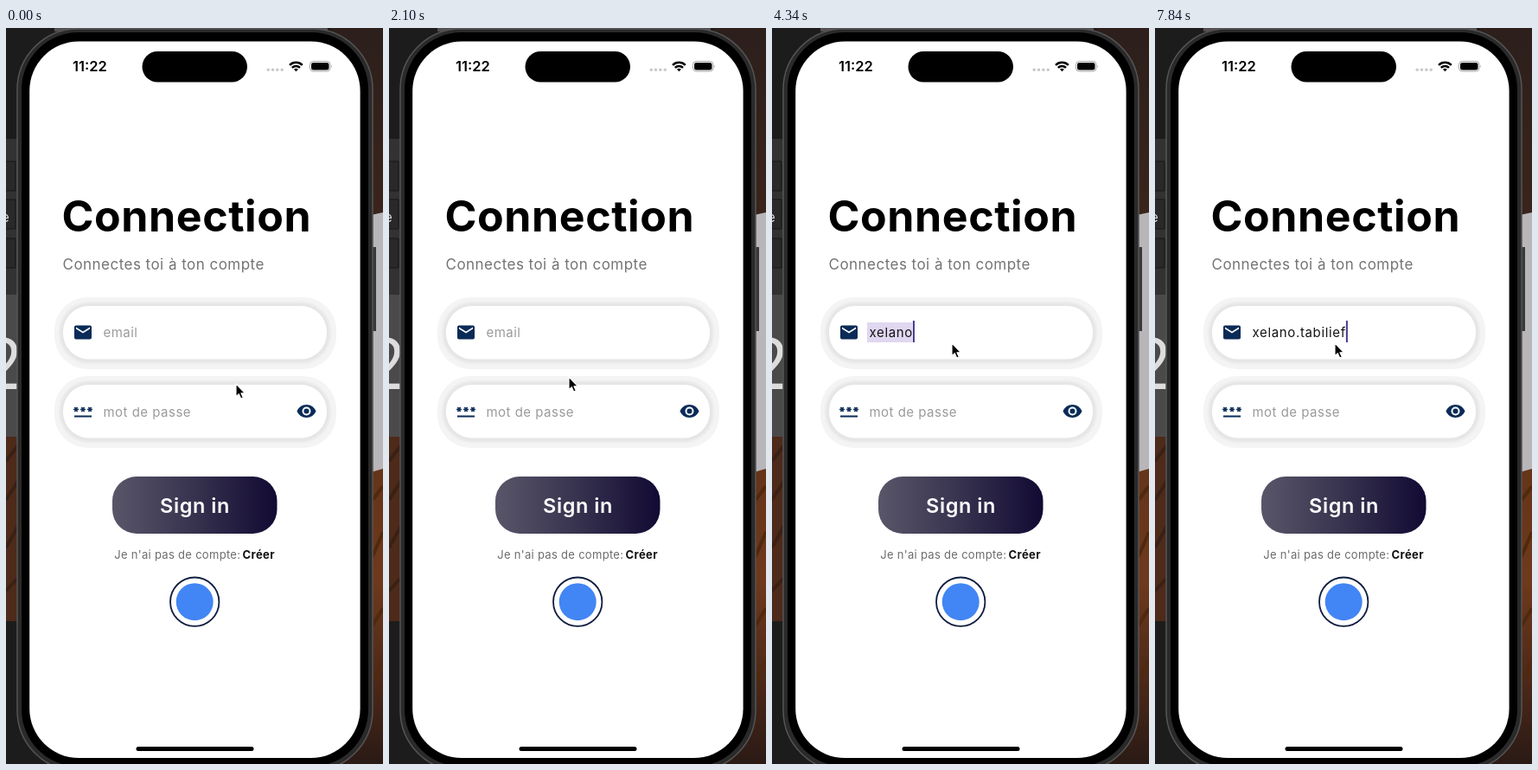
These frames come from a looping animation (436 px wide and 850 px high, 8000 ms). An HTML page:

```html
<!DOCTYPE html>
<html lang="fr">
<head>
<meta charset="utf-8">
<title>Connection</title>
<style>
  html, body { margin: 0; width: 100%; height: 100%; overflow: hidden; background: #1d1c1c; }
  svg { display: block; width: 436px; height: 850px; }
  text { font-family: Inter, "Open Sans", sans-serif; white-space: pre; }
  .title { font-size: 50px; font-weight: 700; letter-spacing: .6px; }
  .sub { font-size: 17px; letter-spacing: .47px; fill: #747474; }
  .hint { font-size: 15px; letter-spacing: .48px; fill: #9a9a9a; }
  .typed { font-size: 15px; letter-spacing: .65px; fill: #151515; }
  .action { font-size: 23.5px; font-weight: 600; letter-spacing: .55px; fill: #fff; }
  .note { font-size: 13px; letter-spacing: .3px; fill: #6c6c6c; }
  .link { font-weight: 700; letter-spacing: .4px; fill: #111; }
  .clock { font-size: 16.5px; font-weight: 600; }
  .icon { fill: #0a2b57; }
</style>
</head>
<body>
<svg viewBox="0 0 436 850">
  <defs>
    <linearGradient id="wood" x1="0" y1="0" x2="0" y2="1">
      <stop offset="0" stop-color="#2c1f1c"/>
      <stop offset=".25" stop-color="#3a241b"/>
      <stop offset=".6" stop-color="#653419"/>
      <stop offset=".75" stop-color="#6f391c"/>
      <stop offset=".9" stop-color="#482718"/>
      <stop offset="1" stop-color="#2a1a15"/>
    </linearGradient>
    <linearGradient id="button">
      <stop offset="0" stop-color="#595669"/>
      <stop offset=".5" stop-color="#37324e"/>
      <stop offset="1" stop-color="#120a33"/>
    </linearGradient>
    <filter id="soft" x="-10%" y="-30%" width="120%" height="160%">
      <feGaussianBlur stdDeviation="1.6"/>
    </filter>
    <g id="field">
      <rect x="56" y="311" width="326" height="83" rx="38" fill="#f4f4f4"/>
      <rect x="62" y="317" width="313" height="70" rx="34" fill="#e5e5e5" filter="url(#soft)"/>
      <rect x="66" y="321" width="305" height="61.500" rx="30" fill="#fff"/>
    </g>
    <path id="star" d="M1 9.970h6M2.500 7.370l3 5.200M5.500 7.370l-3 5.200" fill="none" stroke="#0a2b57" stroke-width="1.500"/>
  </defs>

  <!-- desktop -->
  <rect width="436" height="850" fill="#1d1c1c"/>
  <rect y="128" width="16" height="180" fill="#333232"/>
  <path d="M0 154h11v34H0M0 198h11v34H0M0 243h11v34H0" fill="#2a2929" stroke="#161616"/>
  <text x="-5" y="224" font-size="15" fill="#ddd">e</text>
  <rect y="308" width="16" height="164" fill="#4b4a4a"/>
  <text x="-27" y="417" font-size="82" fill="#ddd" style="font-family:'Open Sans',sans-serif">2</text>
  <rect y="472" width="16" height="213" fill="#4d2a1a"/>
  <path d="M0 500l14 -18M0 545l14 -22M0 600l14 -25M0 650l14 -15" stroke="#3a2015" stroke-width="4"/>
  <rect x="376" width="60" height="850" fill="url(#wood)"/>
  <path d="M424 545l12 -16M424 610l12 -28M424 690l12 -20M424 755l12 -25" stroke="#50290f" stroke-width="4"/>
  <path d="M422 216l14 -3v296l-14 4z" fill="#b8b6b9"/>
  <rect x="422" y="253" width="6" height="97" fill="#3a393b"/>
  <rect x="56" width="316" height="4" fill="#55504f"/>

  <!-- phone -->
  <rect x="13" y="1" width="411" height="857" rx="70" fill="#2a2a2b" stroke="#555" stroke-width="1.500"/>
  <rect x="18" y="5" width="401" height="848" rx="66"/>
  <rect x="27.200" y="15.500" width="382.400" height="827.500" rx="57" fill="#fff"/>
  <rect x="157.500" y="27" width="121.500" height="35.500" rx="17.750"/>
  <rect x="150.500" y="830" width="136" height="5" rx="2.500"/>

  <!-- status bar -->
  <text class="clock" x="97" y="50" text-anchor="middle">11:22</text>
  <path d="M303.200 48.300h17" stroke="#c9c9c9" stroke-width="3.600" stroke-linecap="round" stroke-dasharray="0 5.330"/>
  <g fill="none" stroke="#000" stroke-width="2.500">
    <path d="M328 42.800a10.500 10.500 0 0 1 14.800 0"/>
    <path d="M330.800 45.800a6.500 6.500 0 0 1 9.200 0"/>
  </g>
  <path d="M335.400 50.300l-2.400-2.500a3.500 3.500 0 0 1 4.800 0z"/>
  <rect x="351.500" y="38.500" width="23.500" height="11.500" rx="3.800" fill="none" stroke="#a5a5a5"/>
  <rect x="353" y="40" width="20.500" height="8.500" rx="2.500"/>
  <path d="M376.300 42.500q1.600 1.700 0 3.500z" fill="#a5a5a5"/>

  <!-- form -->
  <text class="title" x="64.500" y="235">Connection</text>
  <text class="sub" x="65.500" y="279">Connectes toi à ton compte</text>
  <use href="#field"/>
  <use href="#field" y="91"/>
  <path class="icon" transform="translate(77 339.500)" d="M20 4H4c-1.100 0-2 .9-2 2v12c0 1.100.9 2 2 2h16c1.100 0 2-.9 2-2V6c0-1.100-.9-2-2-2zm0 4l-8 5-8-5V6l8 5 8-5z"/>
  <g class="icon" transform="translate(77 430.500)">
    <use href="#star"/><use href="#star" x="8"/><use href="#star" x="16"/>
    <rect x="2" y="17" width="20" height="2"/>
  </g>
  <g class="icon" transform="translate(335.500 430.500)">
    <path fill-rule="evenodd" d="M12 4.500C7 4.500 2.730 7.610 1 12c1.730 4.390 6 7.500 11 7.500s9.270-3.110 11-7.500c-1.730-4.390-6-7.500-11-7.500zM7 12a5 5 0 0 0 10 0a5 5 0 0 0-10 0z"/>
    <circle cx="12" cy="12" r="3"/>
  </g>
  <rect id="mark" x="110" y="340" width="55" height="23" fill="#673ab7" opacity="0"/>
  <text class="hint" id="hint" x="112.500" y="357">email</text>
  <text class="typed" id="typed" x="112.500" y="357"></text>
  <rect id="caret" y="338" width="2" height="25" fill="#443a8c" opacity="0"/>
  <text class="hint" x="112.500" y="448.500">mot de passe</text>

  <rect x="123" y="518" width="190.500" height="66" rx="28" fill="url(#button)"/>
  <text class="action" x="218.500" y="559.500" text-anchor="middle">Sign in</text>
  <text class="note" x="125.200" y="613">Je n'ai pas de compte:</text>
  <text class="note link" x="273.500" y="613">Créer</text>
  <circle cx="218.200" cy="662.700" r="28.200" fill="#fff" stroke="#0f1d40" stroke-width="1.800"/>
  <circle cx="218.200" cy="662.700" r="21.500" fill="#4285f4"/>

  <path id="pointer" d="M0 0V14.600L3.300 11.600L5.700 17L8.200 15.900L5.900 10.700H10.300Z" stroke="#fff" stroke-width="1.100" stroke-linejoin="round"/>
</svg>
<script>
  const LOOP = 8000, TICK = 70, TEXT_X = 112.5;
  const NAME = "xelano.tabilief";

  // [time, x, y] of the pointer tip
  const PATH = [
    [0, 266, 411], [280, 237, 330], [630, 189, 209], [700, 176, 187],
    [770, 176, 187], [840, 167, 207], [910, 167, 207], [1120, 250, 212],
    [1330, 353, 222], [1400, 350, 226], [1610, 235, 229], [1750, 166, 229],
    [1820, 158, 235], [1960, 176, 322], [2100, 208, 403], [2170, 208, 403],
    [2310, 219, 387], [2450, 212, 371], [2590, 208, 364]
  ];
  // [time, number of letters]
  const KEYS = [
    [0, 0], [3010, 1], [3080, 2], [3570, 3], [3780, 4], [3990, 5], [4130, 6],
    [4900, 5], [5530, 6], [6370, 7], [6790, 8], [6860, 9], [7070, 10],
    [7280, 11], [7490, 12], [7630, 13], [7700, 14], [7840, 15]
  ];

  const [pointer, typed, hint, caret, mark] =
    ["pointer", "typed", "hint", "caret", "mark"].map(id => document.getElementById(id));
  const within = (t, a, b) => t >= a && t < b;

  function pointerAt(t) {
    const i = PATH.findIndex(p => p[0] > t);
    if (i < 0) return PATH[PATH.length - 1].slice(1);
    const [t0, x0, y0] = PATH[i - 1], [t1, x1, y1] = PATH[i];
    const k = (t - t0) / (t1 - t0);
    return [x0 + (x1 - x0) * k, y0 + (y1 - y0) * k];
  }

  function caretAlpha(t) {
    if (t < 2450) return 0;
    if (within(t, 6090, 6370)) return Math.max(0, 1 - (t - 6020) / 210);
    return 1;
  }

  function draw(t) {
    const [x, y] = pointerAt(t);
    pointer.setAttribute("transform", `translate(${x} ${y})`);

    const count = KEYS.filter(k => k[0] <= t).pop()[1];
    typed.textContent = NAME.slice(0, count);
    hint.setAttribute("opacity", count ? 0 : 1);

    const width = count ? typed.getComputedTextLength() : 0;
    caret.setAttribute("x", TEXT_X + width);
    caret.setAttribute("opacity", caretAlpha(t));

    const marked = within(t, 3990, 4130) || within(t, 4340, 4760);
    mark.setAttribute("width", width + 2);
    mark.setAttribute("opacity", marked ? .2 : 0);
  }

  function frame() {
    const t = performance.now() % LOOP;
    draw(Math.floor(t / TICK) * TICK);
    requestAnimationFrame(frame);
  }
  frame();
</script>
</body>
</html>
```
